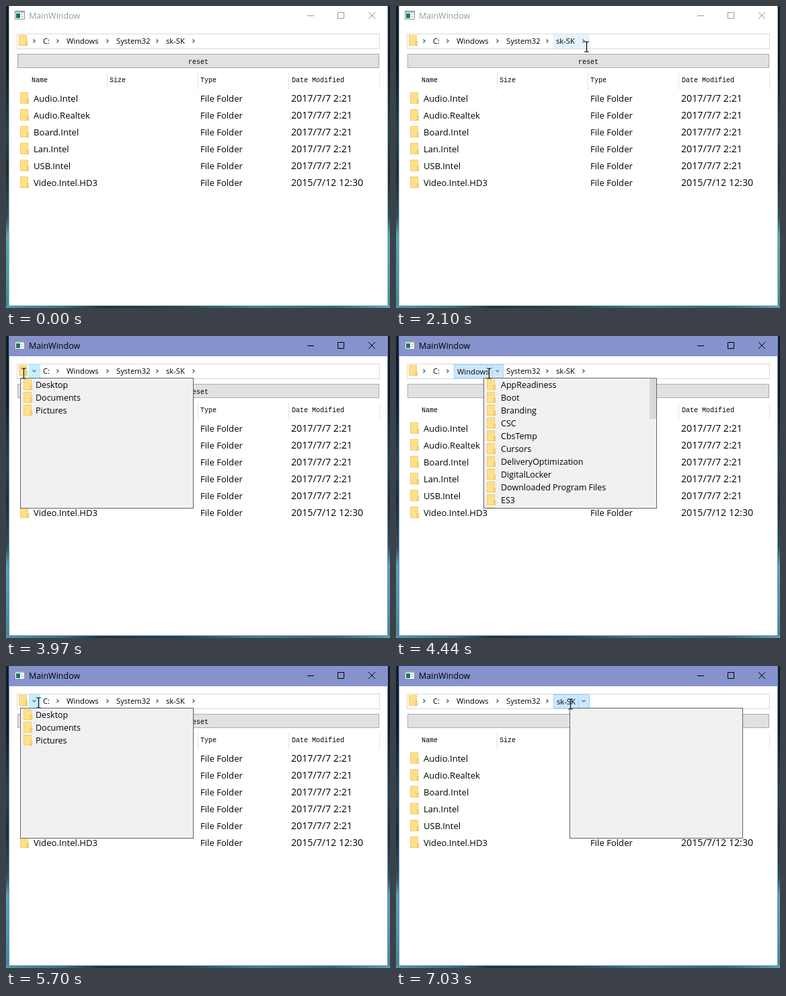
An HTML page that plays this animation: 571 by 448 pixels, repeating every 8000 ms.

```html
<!DOCTYPE html>
<html lang="en">
<head>
<meta charset="utf-8">
<title>Breadcrumb address bar</title>
<style>
html, body { margin: 0; width: 100%; height: 100%; overflow: hidden; background: #0b1d25; }
svg { display: block; width: 100%; height: 100%; }
text { font-family: "Open Sans", "Noto Sans", sans-serif; white-space: pre; }
.list { font-size: 13.1px; }
.date { font-size: 14.2px; }
.crumb { font-size: 11.2px; }
.menu { font-size: 12.5px; }
.title { font-size: 12.5px; }
.mono { font: 10px "Liberation Mono", monospace; }
</style>
</head>
<body>
<script>
const NS = "http://www.w3.org/2000/svg";
const LOOP = 8000;

function add(parent, tag, attrs = {}, content) {
  const el = document.createElementNS(NS, tag);
  for (const key in attrs) el.setAttribute(key, attrs[key]);
  if (content !== undefined) el.textContent = content;
  parent.append(el);
  return el;
}
const rect = (p, x, y, width, height, fill, stroke = "none") =>
  add(p, "rect", { x, y, width, height, fill, stroke });
const label = (p, x, y, cls, content) =>
  add(p, "text", { x, y, class: cls, fill: "#000" }, content);
const line = (p, d, stroke, width = 1) =>
  add(p, "path", { d, stroke, fill: "none", "stroke-width": width });
const show = (el, on) => el.setAttribute("visibility", on ? "visible" : "hidden");

function folder(parent, x, y, h = 16) {
  const g = add(parent, "g", { transform: `translate(${x} ${y})` });
  rect(g, .5, .5, 11, h - 1, "#ffe08a", "#f2cd69");
  rect(g, 10.5, h - 6.5, 2, 6, "#ffe7a2", "#e9c056");
}

const svg = add(document.body, "svg", { viewBox: "0 0 571 448", preserveAspectRatio: "none" });
const defs = add(svg, "defs");

function gradient(id, vertical, stops) {
  const g = add(defs, "linearGradient", { id, x2: vertical ? 0 : 1, y2: vertical ? 1 : 0 });
  stops.forEach(([offset, color]) => add(g, "stop", { offset, "stop-color": color }));
}

// Desktop behind the window
gradient("sides", true, [[0, "#0c2029"], [.2, "#0d1a20"], [.42, "#21454d"], [.55, "#1b2e36"],
  [.7, "#2a525b"], [.76, "#54a6b0"], [.9, "#4a9aa6"], [1, "#3f8892"]]);
gradient("below", false, [[0, "#4b9ca6"], [.14, "#357680"], [.25, "#15343d"], [.45, "#1d4650"],
  [.65, "#3c838c"], [.85, "#2d6871"], [1, "#55a5ae"]]);
rect(svg, 0, 0, 571, 448, "url(#sides)");
rect(svg, 0, 444, 571, 4, "url(#below)");

// Window frame and title bar
const frame = rect(svg, 4.5, -1.5, 563, 446, "#fff");
const titleBar = rect(svg, 5, 0, 562, 30, "#8592cc");
rect(svg, 13.5, 7.5, 14, 12, "#fff", "#8b9499");
rect(svg, 14, 8, 13, 2, "#a8b4bb");
rect(svg, 15, 11, 6, 7, "#16776f");
line(svg, "M22.5 12.5h3M22.5 15.5h3", "#9aa4aa");
const title = label(svg, 34, 19, "title", "MainWindow");
const controls = line(svg, "M448 14.5h10M493.5 9.5h9v9h-9zM539 9l10 10M549 9l-10 10", "#999");

// Address bar, button, file list
rect(svg, 16.5, 41.5, 539, 22, "#fff", "#d9d9d9");
folder(svg, 19, 43);
const crumbLayer = add(svg, "g");
const button = rect(svg, 17.5, 71.5, 537, 20, "#e1e1e1");
label(svg, 271, 86, "mono", "reset");

[[38, "Name"], [154, "Size"], [289, "Type"], [425, "Date Modified"]]
  .forEach(([x, name]) => label(svg, x, 113, "mono", name));
[150.5, 285.5, 420.5, 555.5].forEach(x => line(svg, `M${x} 99V124`, "#e5e5e5"));

["Audio.Intel", "Audio.Realtek", "Board.Intel", "Lan.Intel", "USB.Intel", "Video.Intel.HD3"]
  .forEach((name, i) => {
    const y = 142 + 25 * i;
    folder(svg, 21, y - 14, 17);
    label(svg, 41, y, "list", name);
    label(svg, 289, y, "list", "File Folder");
    label(svg, 424, y, "date", i < 5 ? "2017/7/7 2:21" : "2015/7/12 12:30");
  });

// Crumbs: left edge, start of the arrow part, right edge, menu entries
const crumbs = [
  { name: "", left: 17, arrow: 34, right: 51, menu: ["Desktop", "Documents", "Pictures"] },
  { name: "C:", left: 51, arrow: 69, right: 86,
    menu: ["PerfLogs", "Program Files", "Program Files (x86)", "Users", "Windows"] },
  { name: "Windows", left: 86, arrow: 143, right: 160,
    menu: ["AppReadiness", "Boot", "Branding", "CSC", "CbsTemp", "Cursors", "DeliveryOptimization",
      "DigitalLocker", "Downloaded Program Files", "ES3", "Fonts"] },
  { name: "System32", left: 160, arrow: 217, right: 234,
    menu: ["0409", "1033", "2052", "AdvancedInstallers", "AppLocker", "BestPractices", "Bthprops",
      "CleanLog", "Configuration", "DiagSvcs", "Dism"] },
  { name: "sk-SK", left: 234, arrow: 271, right: 288, menu: [] }
];

function buildMenu(crumb, index) {
  const x = crumb.arrow - 13;
  const g = add(svg, "g");
  rect(g, x + .5, 62.5, 257, 193, "#f1f1f1", "#646464");
  const clip = add(defs, "clipPath", { id: "menu" + index });
  rect(clip, x + 1, 63, 256, 192, "#000");
  const body = add(g, "g", { "clip-path": `url(#menu${index})` });
  crumb.menu.forEach((entry, i) => {
    folder(body, x + 5, 64 + 19 * i);
    label(body, x + (index ? 26 : 23), 77 + 19 * i, "menu", entry);
  });
  if (crumb.menu.length > 10) rect(body, x + 247, 63, 10, 60, "#d8d8d8");
  return g;
}

crumbs.forEach((c, i) => {
  const from = i ? c.left : c.arrow;
  c.hover = rect(crumbLayer, from, 42, c.right - from, 21, "#e5f3ff");
  c.open = add(crumbLayer, "g");
  rect(c.open, from + .5, 42.5, c.right - from - 1, 20, i ? "#cce8ff" : "#c4f1ff", i ? "#99d1ff" : "#b4e9fb");
  if (i) line(c.open, `M${c.arrow + .5} 42V63`, "#99d1ff");
  c.text = label(crumbLayer, c.left + 4, 56, "crumb", c.name);
  const mid = c.arrow + 8;
  c.closed = line(crumbLayer, `M${mid - 1.5} 49.5l2.5 2.5l-2.5 2.5`, "#48606c", 1.4);
  line(c.open, `M${mid - 2.5} 50.5l2.5 2.5l2.5 -2.5`, "#5f7886", 1.3);
  c.popup = buildMenu(c, i);
});

const cursor = add(svg, "g");
const beam = "M-3.5 -7.5h2.5l1 1l1 -1h2.5M0 -6.5V6.5M-3.5 7.5h2.5l1 -1l1 1h2.5";
line(cursor, beam, "#fff", 2.2).setAttribute("opacity", .6);
line(cursor, beam, "#000", 1.2);

// Moments at which the picture refreshes: [first, last, count]
const ticks = [[0, 0, 1], [540, 1310, 11], [1380, 1380, 1], [2100, 2100, 1], [2410, 2410, 1],
  [2570, 2570, 1], [2870, 3590, 10], [3970, 4750, 11], [4840, 5610, 11], [5700, 5930, 4],
  [6100, 6860, 11], [6950, 7030, 2]]
  .flatMap(([a, b, n]) => Array.from({ length: n }, (_, i) => n > 1 ? a + (b - a) * i / (n - 1) : a));

// Pointer path: time, x, y
const path = [[540, 560, 190], [900, 400, 110], [1310, 290, 62], [1380, 286, 61], [2100, 283, 60],
  [2870, 276, 60], [3270, 174, 59], [3590, 30, 56], [3970, 26, 55], [4400, 128, 55],
  [4840, 247, 55], [4990, 243, 55], [5300, 150, 54], [5610, 56, 54], [5930, 28, 54],
  [6100, 42, 54], [6330, 121, 54], [6650, 210, 55], [7030, 259, 56]];

function pointerAt(t) {
  const next = path.findIndex(p => p[0] > t);
  if (next < 0) return path.at(-1).slice(1);
  if (next === 0) return path[0].slice(1);
  const [a, b] = [path[next - 1], path[next]];
  const k = (t - a[0]) / (b[0] - a[0]);
  return [1, 2].map(i => Math.round(a[i] + (b[i] - a[i]) * k));
}

function render(time) {
  const t = ticks.findLast(tick => tick <= time + .5);
  const [x, y] = pointerAt(t);
  const moved = t >= 540;
  const active = t >= 2410;
  const menuOpen = t >= 2570;

  show(titleBar, active);
  frame.setAttribute("stroke", active ? "#7480b8" : "#a3b0b4");
  title.setAttribute("fill", active ? "#000" : "#88a398");
  controls.setAttribute("stroke", active ? "#000" : "#999");
  button.setAttribute("stroke", moved ? "#adadad" : "#94a8b0");

  show(cursor, moved);
  cursor.setAttribute("transform", `translate(${x + .5} ${y + .5})`);

  const over = moved && y < 64 ? crumbs.findIndex(c => x < c.right) : -1;
  crumbs.forEach((c, i) => {
    const here = i === over;
    const open = here && menuOpen;
    show(c.hover, here && !open);
    show(c.open, open);
    show(c.closed, !open);
    show(c.popup, open);
    c.text.setAttribute("transform", open ? "translate(1 1)" : "");
  });
}

const start = performance.now();
function loop() {
  render((performance.now() - start) % LOOP);
  requestAnimationFrame(loop);
}
loop();
</script>
</body>
</html>
```
